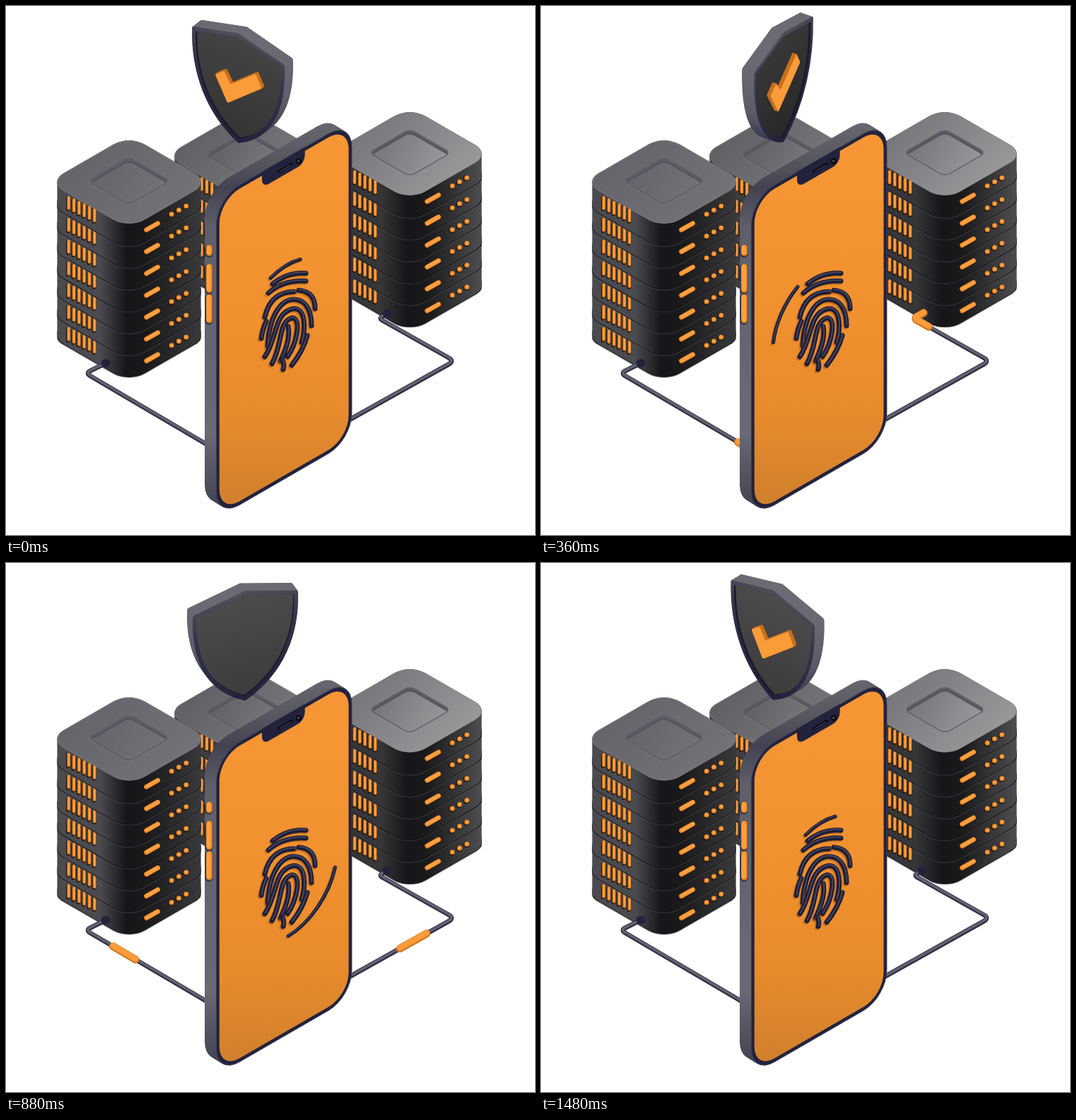
An HTML page with a canvas that plays this animation: 748 px wide and 748 px high, repeating every 1.52 s.

```html
<!DOCTYPE html>
<html lang="en">
<head>
<meta charset="utf-8">
<title>Secure phone and servers</title>
<style>
html, body { margin: 0; width: 100%; height: 100%; overflow: hidden; background: #fff; }
canvas { display: block; }
</style>
</head>
<body>
<canvas id="stage" width="748" height="748"></canvas>
<script>
const SIZE = 748, LOOP = 1520, STEP = 40;
const NAVY = '#22223d';
const stage = document.getElementById('stage').getContext('2d');
let ctx = stage;

// Motion keys, shared times in ms
const TIMES = [-40, 0, 240, 480, 640, 880, 1240, 1480, 1520];
const SHIELD_TURN = [43, 36, -20, -101, -152, -203, -290, -317, -324];
const ARC_LEAD = [110, 110, 142, 209, 261, 344, 443, 470, 470];
const ARC_TAIL = [75, 75, 98, 148, 192, 271, 394, 435, 435];
const RIGHT_PULSE = [-6, -6, 11, 79, 132, 220, 320, 352, 352];
const LEFT_PULSE = [-25, -25, -12, 40, 85, 157, 240, 278, 278];

// Monotone cubic interpolation
function track(t, keys) {
  const secant = i => (keys[i + 1] - keys[i]) / (TIMES[i + 1] - TIMES[i]);
  const slope = i => {
    const a = secant(i - 1), b = secant(i);
    return a * b <= 0 ? 0 : 2 * a * b / (a + b);
  };
  let i = 1;
  while (i < TIMES.length - 3 && t >= TIMES[i + 1]) i++;
  const span = TIMES[i + 1] - TIMES[i], s = (t - TIMES[i]) / span, r = 1 - s;
  return keys[i] * r * r * (1 + 2 * s) + keys[i + 1] * s * s * (3 - 2 * s)
    + span * (slope(i) * s * r * r - slope(i + 1) * s * s * r);
}

function gradient(x0, y0, x1, y1, ...stops) {
  const g = ctx.createLinearGradient(x0, y0, x1, y1);
  stops.forEach(([at, color]) => g.addColorStop(at, color));
  return g;
}

function strokePath(path, color, width, dx = 0, dy = 0) {
  ctx.save();
  ctx.translate(dx, dy);
  ctx.strokeStyle = color;
  ctx.lineWidth = width;
  ctx.stroke(path);
  ctx.restore();
}

function layerCanvas(draw) {
  const c = document.createElement('canvas');
  c.width = c.height = SIZE;
  ctx = c.getContext('2d');
  ctx.lineCap = ctx.lineJoin = 'round';
  draw();
  ctx = stage;
  return c;
}

// ---- Servers ----
const UNIT = 30.9;

function tile(x, y, half, radius) {
  const flat = new Path2D(), path = new Path2D();
  flat.roundRect(-half, -half, 2 * half, 2 * half, radius);
  path.addPath(flat, new DOMMatrix([0.866, 0.5, -0.866, 0.5, x, y]));
  return path;
}

function pill(x, y, dx, dy, width) {
  const path = new Path2D();
  path.moveTo(x - dx, y - dy);
  path.lineTo(x + dx, y + dy);
  strokePath(path, '#17130f', width + 1.2, -0.6, 0.8);
  strokePath(path, '#d97a1d', width);
  strokePath(path, '#fba043', width - 2, 0.4, -0.4);
}

function unit(x, y, { left, right }) {
  const base = tile(x, y + UNIT, 66, 25);
  ctx.save();
  ctx.beginPath();
  ctx.rect(x - 101.6, 0, 203.2, SIZE);
  ctx.clip();
  strokePath(base, 'rgba(95,95,102,.45)', 4);
  strokePath(base, '#121216', 1.8);
  ctx.restore();
  ctx.fillStyle = gradient(x - 102, 0, x + 102, 0, [0, left], [0.3, left],
    [0.48, '#16161a'], [0.62, '#1a1a1c'], [1, right]);
  ctx.fill(base);
  ctx.fillRect(x - 101.6, y, 203.2, UNIT);
  ctx.fill(tile(x, y, 66, 25));
  for (let i = 0; i < 6; i++) pill(x - 85.5 + 7.3 * i, y + 29.5 + 3.5 * i, 0, 7.8, 4.6);
  pill(x + 32.5, y + 63, 8, -4.5, 7);
  for (let i = 0; i < 3; i++) pill(x + 60 + 10.3 * i, y + 45.5 - 5.8 * i, 0.1, 0, 7);
}

function tower(x, y, count, shade) {
  for (let k = count - 1; k >= 0; k--) unit(x, y + k * UNIT, shade);
  const { light, dark } = shade;
  const pit = tile(x, y - 1.5, 33.5, 8);
  ctx.fillStyle = gradient(x - 60, y - 50, x + 50, y + 55, [0, dark], [1, light]);
  ctx.fill(tile(x, y, 66, 25));
  strokePath(tile(x, y, 65.3, 24.5), 'rgba(140,140,146,.4)', 1);
  ctx.save();
  ctx.clip(pit);
  ctx.fillStyle = '#55555d';
  ctx.fill(pit);
  ctx.fillStyle = gradient(x - 40, y - 25, x + 40, y + 25, [0, dark], [1, light]);
  ctx.fill(tile(x, y + 4, 33.5, 8));
  ctx.restore();
  strokePath(pit, '#55555d', 1.2);
  strokePath(pit, 'rgba(160,160,168,.35)', 0.8, 0, 1.2);
}

const backdrop = layerCanvas(() => {
  tower(340, 212, 5, { light: '#7b7b7f', dark: '#606064', left: '#3e3e42', right: '#3a3a3c' });
  tower(174, 249, 7, { light: '#727277', dark: '#64646a', left: '#4a4a4f', right: '#39393b' });
  tower(571, 209, 6, { light: '#98989b', dark: '#76767a', left: '#363638', right: '#4e4e50' });
});

// ---- Cables ----
const LEFT_CABLE = new Path2D('M284 620L119 523Q113 519 119 516L143 504');
const RIGHT_CABLE = new Path2D('M541 434L532 439Q527 442 533 445L627 498Q633 502 627 506L484 586');

function cable(path, plugX, plugY) {
  strokePath(path, '#2e2e46', 6.6);
  strokePath(path, '#62626f', 3.6, 0, -0.7);
  ctx.fillStyle = NAVY;
  ctx.beginPath();
  ctx.ellipse(plugX, plugY, 6.5, 6, 0, 0, 7);
  ctx.fill();
}

function pulse(path, lead, length) {
  ctx.save();
  ctx.setLineDash([length - 6, 9999]);
  ctx.lineDashOffset = length - 3 - lead;
  strokePath(path, '#d67a20', 11);
  strokePath(path, '#fa9c3b', 8, 0, -1);
  ctx.restore();
}

// ---- Phone ----
function panel(dx, dy, inset) {
  const flat = new Path2D(), path = new Path2D();
  flat.roundRect(inset, inset, 222 - 2 * inset, 453 - 2 * inset, 38 - inset);
  path.addPath(flat, new DOMMatrix([0.866, -0.5, 0, 1, 297 + dx, 272 + dy]));
  return path;
}

function ridge(path, width) {
  strokePath(path, 'rgba(165,85,15,.45)', width, -2, 2);
  strokePath(path, '#1d1d36', width);
  strokePath(path, '#45455c', width * 0.28, 0.5, -1.2);
}

const PRINT = [
  'M377 393Q398 376 424 378',
  'M371 406Q392 387 424 389',
  'M366 440Q374 404 408 404',
  'M414 402Q437 404 437 428',
  'M361 470Q363 456 368 446',
  'M370 481C372 440 388 414 408 415C428 416 432 438 432 452',
  'M366 496C384 470 378 434 406 428C424 426 424 456 418 476',
  'M376 506C392 478 384 448 404 441C418 440 412 476 398 496',
  'M399 453Q403 472 388 502',
  'M426 466Q420 488 404 508',
  'M392 514Q394 508 391 501'
];

const phone = layerCanvas(() => {
  ctx.fillStyle = gradient(0, 165, 0, 712, [0, '#67676f'], [0.1, '#56565f'], [0.17, '#424252'],
    [0.27, '#5f5f69'], [0.8, '#6a6a76'], [1, '#40404f']);
  for (let d = 1; d > 0; d -= 0.04) ctx.fill(panel(-16 * d, -10 * d, 0));
  const front = panel(0, 0, 0), screen = panel(0, 0, 5.5);
  ctx.fillStyle = NAVY;
  ctx.fill(front);
  strokePath(panel(0, 0, 0.5), 'rgba(90,90,112,.5)', 1);
  ctx.fillStyle = gradient(0, 190, 0, 700, [0, '#f79634'], [0.5, '#f0902e'], [0.75, '#e88b2c'], [1, '#d1802d']);
  ctx.fill(screen);

  ctx.save();
  ctx.clip(front);
  ctx.transform(0.866, -0.5, 0, 1, 362, 240);
  ctx.fillStyle = NAVY;
  ctx.beginPath();
  ctx.roundRect(0, -8, 70, 25, [0, 0, 11, 11]);
  ctx.fill();
  ctx.restore();
  strokePath(new Path2D('M386 234L404 223.5'), '#0b0b14', 4);
  strokePath(new Path2D('M387 234L403 225'), '#56566a', 1);
  ctx.fillStyle = '#0b0b14';
  ctx.beginPath();
  ctx.arc(414, 219.5, 4.2, 0, 7);
  ctx.fill();
  ctx.fillStyle = '#55556b';
  ctx.beginPath();
  ctx.arc(413.5, 219, 1.6, 0, 7);
  ctx.fill();

  [[337, 17], [364, 42], [407, 42]].forEach(([y, h]) => {
    const button = new Path2D();
    button.moveTo(287.5, y + 5);
    button.lineTo(287.5, y + h - 5);
    strokePath(button, '#30303f', 11, -0.5, 1);
    strokePath(button, '#d87c20', 9);
    strokePath(button, '#fb9f40', 6.5, -0.8, -0.5);
  });
  PRINT.forEach(d => ridge(new Path2D(d), 7));
});

function orbit(t) {
  const rad = Math.PI / 180, flat = new Path2D(), path = new Path2D();
  flat.arc(0, 0, 81, -track(t, ARC_LEAD) * rad, -track(t, ARC_TAIL) * rad);
  path.addPath(flat, new DOMMatrix([0.866, -0.5, 0, 1, 398, 447]));
  ridge(path, 5);
}

// ---- Shield ----
const DEPTH = 10;

function shieldShape(k) {
  const p = (u, v) => `${u * k} ${110 + (v - 110) * k} `;
  return new Path2D('M' + p(0, 37) + 'L' + p(78, 54) + 'C' + p(80, 113) + p(57, 162) + p(0, 186)
    + 'C' + p(-57, 162) + p(-80, 113) + p(-78, 54) + 'Z');
}
const BODY = shieldShape(1), FACE = shieldShape(0.96);
const CHECK = new Path2D('M-36.5 105L-24 97L-12.5 112L31 82.5L39.5 96L-17.2 134.5Z');

function shield(t) {
  const turn = track(t, SHIELD_TURN), half = Math.round(turn / 180);
  const deg = turn - 180 * half, hasCheck = half % 2 === 0;
  const cos = Math.cos(deg * Math.PI / 180), sin = Math.sin(deg * Math.PI / 180);
  const setDepth = d => ctx.setTransform(cos, 0.577 * sin, 0, 1, 334.5 - d * sin, 0.577 * d * cos);
  const solid = (path, color, edge) => {
    ctx.fillStyle = ctx.strokeStyle = color;
    ctx.lineWidth = edge;
    ctx.fill(path);
    ctx.stroke(path);
  };
  ctx.save();
  const wall = gradient(0, 40, 0, 188, [0, '#6b6b73'], [0.5, '#5c5c68'], [1, '#2b2b45']);
  for (let d = -DEPTH; d < DEPTH; d += 0.75) {
    setDepth(d);
    solid(BODY, wall, 6);
  }
  setDepth(DEPTH);
  solid(BODY, gradient(0, 40, 0, 188, [0, '#4c4c5a'], [0.3, '#35354c'], [1, NAVY]), 6);

  ctx.save();
  ctx.clip(FACE);
  ctx.fillStyle = '#1b1b2c';
  ctx.fill(FACE);
  setDepth(DEPTH - 4);
  const glance = Math.max(0, (deg - 25) / 55);
  const tone = 46 + 60 * glance + (hasCheck ? 0 : Math.min(20, Math.max(0, -deg)));
  const gray = v => `rgb(${v},${v},${v})`;
  ctx.fillStyle = gradient(0, 40, 0, 185, [0, gray(tone + 10)], [1, gray(tone - 6)]);
  ctx.fill(FACE);
  ctx.restore();

  if (hasCheck) {
    for (let d = DEPTH - 4; d < DEPTH + 2; d += 0.75) {
      setDepth(d);
      solid(CHECK, '#c66f1c', 5);
    }
    setDepth(DEPTH + 2);
    solid(CHECK, '#fa9c3a', 4);
  }
  ctx.restore();
}

function draw(t) {
  ctx.fillStyle = '#fff';
  ctx.fillRect(0, 0, SIZE, SIZE);
  ctx.drawImage(backdrop, 0, 0);
  shield(t);
  cable(LEFT_CABLE, 141, 505);
  cable(RIGHT_CABLE, 539, 435);
  pulse(LEFT_CABLE, track(t, LEFT_PULSE), 43);
  pulse(RIGHT_CABLE, track(t, RIGHT_PULSE), 49);
  ctx.drawImage(phone, 0, 0);
  orbit(t);
}

ctx.lineCap = ctx.lineJoin = 'round';
const start = performance.now();
function tick() {
  const elapsed = (performance.now() - start) % LOOP;
  draw(Math.floor(elapsed / STEP) * STEP);
  requestAnimationFrame(tick);
}
tick();
</script>
</body>
</html>
```
